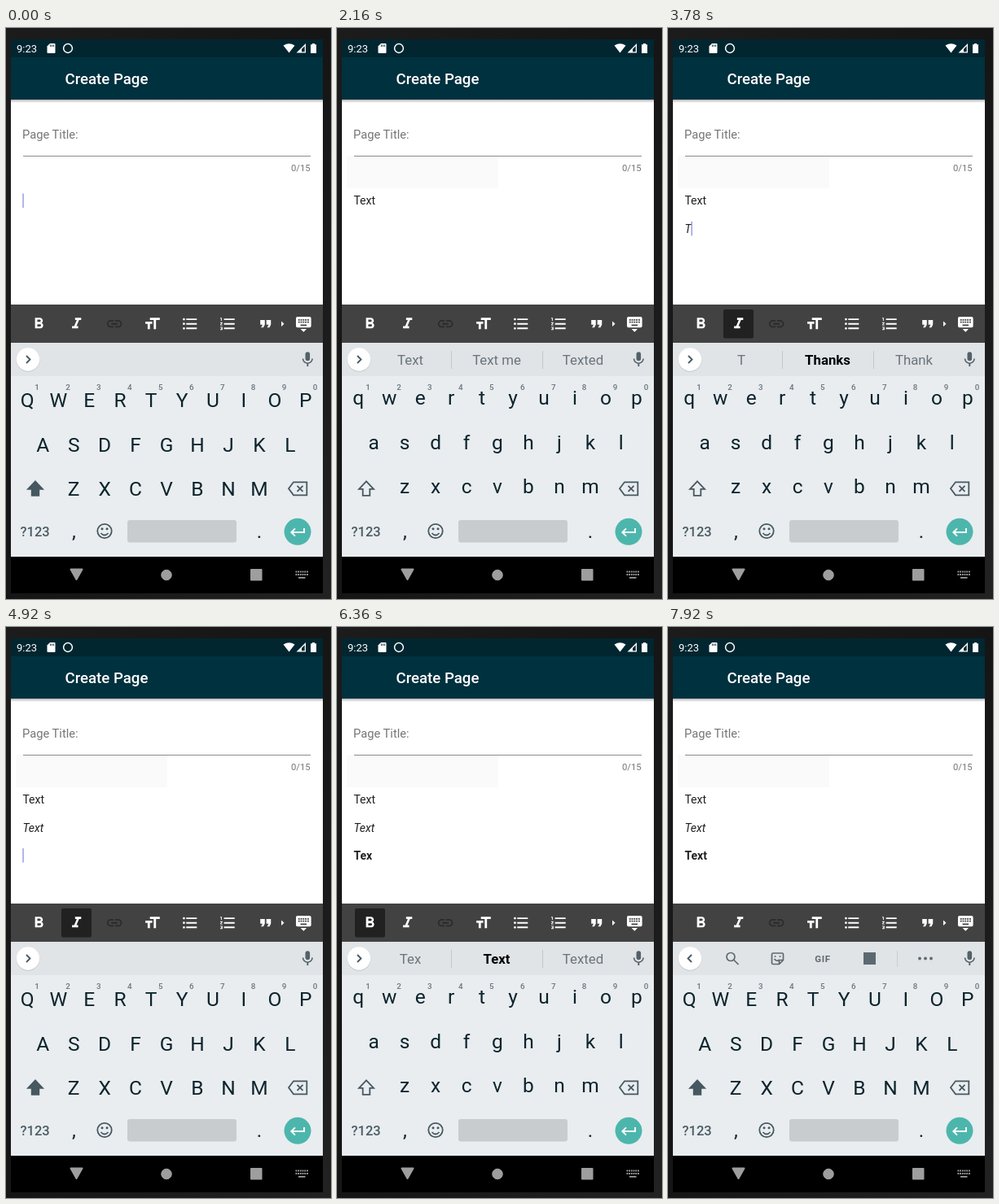
Recreate the animation shown at these times as an HTML page. Size 399x702 px, loop 8000 ms.

```html
<!DOCTYPE html>
<html lang="en">
<head>
<meta charset="utf-8">
<style>
html, body { margin: 0; width: 100%; height: 100%; overflow: hidden; background: #171717; }
svg { display: block; }
text { font-family: Roboto, "Liberation Sans", sans-serif; white-space: pre; }
.mid { text-anchor: middle; }
.key { font-size: 24.5px; fill: #0c242c; }
.num { font-size: 9.8px; font-weight: 500; fill: #69757b; }
.word { font-size: 16.8px; fill: #6a747a; }
.word.best { font-weight: 700; fill: #000; }
.body { font-size: 14px; fill: #212121; }
.line { fill: none; stroke: #465860; stroke-width: 1.8; }
</style>
</head>
<body>
<svg width="399" height="702" viewBox="0 0 399 702">
  <defs>
    <linearGradient id="wall" x2="1" y2="1">
      <stop offset="0" stop-color="#1c1c1c"/><stop offset=".5" stop-color="#151515"/><stop offset="1" stop-color="#222"/>
    </linearGradient>
    <linearGradient id="shade" x2="0" y2="1">
      <stop offset="0" stop-color="#000" stop-opacity=".3"/><stop offset="1" stop-color="#000" stop-opacity="0"/>
    </linearGradient>
  </defs>
  <rect width="399" height="702" fill="url(#wall)"/>

  <!-- status and app bars -->
  <rect x="6" y="14" width="383" height="22" fill="#012630"/>
  <rect x="6" y="36" width="383" height="52" fill="#00313f"/>
  <g fill="#fff">
    <text x="13" y="30" font-size="13">9:23</text>
    <path d="M54 19h5.5q1 0 1 1v10q0 1-1 1h-8q-1 0-1-1v-7.500z"/>
    <path d="M54.500 20.500v2.500M56.500 20.500v2.500M58.500 20.500v2.500" stroke="#012630" stroke-width=".9"/>
    <circle cx="76" cy="25" r="5.400" fill="none" stroke="#fff" stroke-width="1.500"/>
    <path d="M340.500 21.500q7-4.500 14 0l-7 9z"/>
    <path d="M368 19v11.500h-11.500zm-1.300 3.200l-3.700 3.700v3.300h3.700z" fill-rule="evenodd"/>
    <path d="M376 19h3v1.300h2v10.700h-7v-10.700h2z"/>
    <text x="72.500" y="69" font-size="18.640" font-weight="500">Create Page</text>
  </g>

  <!-- page form -->
  <rect x="6" y="88" width="383" height="252" fill="#fff"/>
  <rect x="6" y="88" width="383" height="4" fill="url(#shade)"/>
  <rect id="patch" x="12" y="157" width="186" height="40" fill="#fafafa"/>
  <path d="M21 157.500H374" stroke="#8c8c8c"/>
  <g fill="#757575">
    <text x="20" y="136" font-size="14.700">Page Title:</text>
    <text x="373.500" y="176" font-size="11.200" text-anchor="end">0/15</text>
  </g>
  <g id="lines"></g>
  <rect id="caret" width="1.500" height="17.500" fill="#9a9fe4"/>

  <!-- formatting bar -->
  <rect x="6" y="340" width="383" height="47" fill="#424242"/>
  <rect id="active" y="346" width="37" height="35.500" rx="2" fill="#212121"/>
  <g id="tools" fill="#fff"></g>
  <path d="M338 360.500l3.500 3.300-3.500 3.300z" fill="#fff"/>

  <!-- keyboard -->
  <rect x="6" y="387" width="383" height="41" fill="#e0e4e7"/>
  <rect x="6" y="428" width="383" height="222" fill="#e9edf0"/>
  <circle cx="27" cy="408.300" r="14.500" fill="#c6cbce"/>
  <circle cx="27" cy="407.500" r="14.200" fill="#fff"/>
  <path id="chevron" class="line"/>
  <g id="words"></g>
  <g id="panel" fill="#5d6970">
    <g fill="none" stroke="#5d6970" stroke-width="1.700">
      <circle cx="77" cy="405.500" r="5"/><path d="M80.500 409l6 6"/>
      <path d="M129 401h11q1.500 0 1.500 1.500v7l-5 5h-7.500q-1.500 0-1.500-1.500v-10.500q0-1.500 1.500-1.500zM141 409.500h-4.500v4.500M130.500 408q3 4 6 1"/>
    </g>
    <circle cx="131.500" cy="405" r="1"/><circle cx="137.500" cy="405" r="1"/>
    <text class="mid" x="190" y="411.500" font-size="11.500" font-weight="700" letter-spacing=".7">GIF</text>
    <rect x="240" y="400" width="15" height="15"/>
    <path d="M281.500 398v20" stroke="#c8cdd0"/>
    <circle cx="309" cy="407.500" r="1.900"/><circle cx="316" cy="407.500" r="1.900"/><circle cx="323" cy="407.500" r="1.900"/>
  </g>
  <g id="keys"></g>
  <path id="shift" class="line" d="M36 557.300l9 9.500h-4.700v8h-8.600v-8h-4.700z"/>
  <path class="line" d="M353 558.300h16.300v16H353l-6-8zM357.500 562.800l7 7m0-7l-7 7"/>
  <text x="17.500" y="625" font-size="16.500" font-weight="500" fill="#4b5c64">?123</text>
  <text class="key mid" x="83.500" y="627">,</text>
  <text class="key mid" x="311" y="627">.</text>
  <circle class="line" cx="121" cy="618.500" r="8.700"/>
  <path class="line" d="M116.500 621q4.500 5 9 0"/>
  <circle cx="118" cy="615.800" r="1.500" fill="#465860"/><circle cx="124" cy="615.800" r="1.500" fill="#465860"/>
  <rect x="149" y="605" width="134" height="27.500" rx="3" fill="#c8cccf"/>
  <circle cx="358" cy="619.300" r="16.500" fill="#4db6ac"/>
  <path d="M366 615v5h-15.500M355 615.300l-4.700 4.700 4.700 4.700" fill="none" stroke="#fff" stroke-width="1.900"/>

  <!-- navigation bar -->
  <rect x="6" y="650" width="383" height="45"/>
  <g fill="#9e9e9e" stroke="#9e9e9e" stroke-linejoin="round">
    <path d="M79.500 665.500h14l-7 12.500z" stroke-width="2"/>
    <circle cx="197" cy="672.500" r="6.300"/>
    <rect x="300.500" y="665.500" width="13.500" height="13.500"/>
    <path d="M355.500 668.500h15.500M355.500 672h15.500" stroke-width="1.800" stroke-dasharray="1.800 .9"/>
    <path d="M359 675.800h8.500" stroke-width="1.800"/>
  </g>
</svg>
<script>
const LOOP = 8000, SCALE = .932, PITCH = 37.95, LINE = 34.3;
const $ = id => document.getElementById(id);

function add(parent, tag, attrs, content = '') {
  const el = document.createElementNS('http://www.w3.org/2000/svg', tag);
  for (const name in attrs) el.setAttribute(name, attrs[name]);
  el.textContent = content;
  return parent.appendChild(el);
}
const show = (el, on) => el.setAttribute('visibility', on ? 'visible' : 'hidden');

// Icons live on a 24-unit grid, placed by their centre.
const icon = (parent, cx, cy, d, fill) => add(parent, 'path', {
  d, fill, transform: `translate(${cx - 12 * SCALE} ${cy - 12 * SCALE}) scale(${SCALE})`
});
const bars = 'M7 19h14v-2H7zM7 13h14v-2H7zM7 5v2h14V5z';
const dot = y => `M2.500 ${y}a1.500 1.500 0 1 0 3 0a1.500 1.500 0 1 0-3 0`;
const keycaps = [5, 8, 11, 14, 17].map(x => `M${x} 6v2h2v-2zM${x} 9v2h2v-2z`).join('');
[
  'M15.600 10.790c.97-.67 1.650-1.770 1.650-2.790 0-2.260-1.750-4-4-4H7v14h7.040c2.090 0 3.710-1.700 3.710-3.790 0-1.520-.86-2.820-2.150-3.420zM10 6.500h3c.83 0 1.500.67 1.500 1.500s-.67 1.500-1.500 1.500h-3zm3.500 9H10v-3h3.500c.83 0 1.500.67 1.500 1.500s-.67 1.500-1.500 1.500z',
  'M10 4v3h2.210l-3.420 8H6v3h8v-3h-2.210l3.420-8H18V4z',
  'M3.900 12c0-1.710 1.390-3.100 3.100-3.100h4V7H7a5 5 0 0 0 0 10h4v-1.900H7c-1.710 0-3.100-1.390-3.100-3.100zM8 13h8v-2H8zm9-6h-4v1.900h4a3.100 3.100 0 0 1 0 6.200h-4V17h4a5 5 0 0 0 0-10z',
  'M9 4v3h5v12h3V7h5V4zM3 12h3v7h3v-7h3V9H3z',
  bars + dot(6) + dot(12) + dot(18),
  bars + 'M2 17h2v.5H3v1h1v.5H2v1h3v-4H2zM3 8h1V4H2v1h1zM2 11h1.800L2 13.100v.9h3v-1H3.200L5 10.900V10H2z',
  'M6 17h3l2-4V7H5v6h3zM14 17h3l2-4V7h-6v6h3z'
].forEach((d, i) => icon($('tools'), 40.3 + 46.4 * i, 363.7, d, i === 2 ? '#2b2b2b' : '#fff'));
icon($('tools'), 365.3, 363.5, 'M4 3h16q2 0 2 2v10q0 2-2 2H4q-2 0-2-2V5q0-2 2-2z' + keycaps + 'M8 13v2h8v-2zM12 23l4-4H8z', '#fff')
  .setAttribute('fill-rule', 'evenodd');
icon($('keys'), 370.3, 407.5, 'M12 14a3 3 0 0 0 3-3V5a3 3 0 0 0-6 0v6a3 3 0 0 0 3 3zm5.300-3a5.300 5.300 0 0 1-10.600 0H5c0 3.410 2.720 6.230 6 6.720V21h2v-3.280c3.280-.48 6-3.300 6-6.720z', '#546168');

// Letter keys: first centre and capital baseline of each row
const letters = [];
[['qwertyuiop', 26.3, 466], ['asdfghjkl', 45.2, 520.7], ['zxcvbnm', 83.2, 575]].forEach(([row, x, y]) =>
  [...row].forEach((char, i) =>
    letters.push({ char, y, el: add($('keys'), 'text', { class: 'key mid', x: x + PITCH * i }) })));
[...'1234567890'].forEach((n, i) =>
  add($('keys'), 'text', { class: 'num mid', x: 38 + PITCH * i, y: 445 }, n));

const words = [90, 196, 302].map(x => add($('words'), 'text', { x, y: 414 }));
add($('words'), 'path', { d: 'M140.500 397v22M252.500 397v22', stroke: '#c1c6c9' });
const lines = [0, 1, 2, 3].map(i => add($('lines'), 'text', { class: 'body', x: 20.4, y: 217.3 + LINE * i }));

// An asterisk marks the highlighted suggestion.
const hints = {
  T: ['T', 'Thanks*', 'Thank'],
  Te: ['Te', 'Text*', 'Tell'],
  Tex: ['Tex', 'Text*', 'Texted'],
  Text: ['Text', 'Text me', 'Texted']
};
const actions = [
  [1020, 'T'], [1320, 'e'], [1680, 'x'], [1980, 't'],
  [2760, 'enter'], [3060, 'italic'],
  [3780, 'T'], [4020, 'e'], [4260, 'x'], [4500, 't'],
  [4920, 'enter'], [5580, 'plain'], [5700, 'bold'],
  [5820, 'T'], [6120, 'e'], [6360, 'x'], [6660, 't'],
  [7080, 'enter'], [7260, 'plain']
];

function stateAt(t) {
  const rows = [{ text: '', style: 'plain' }];
  let style = 'plain';
  for (const [time, action] of actions) {
    if (time > t) break;
    if (action === 'enter') rows.push({ text: '', style });
    else if (action.length > 1) rows.at(-1).style = style = action;
    else rows.at(-1).text += action;
  }
  return { rows, style };
}

function draw(t) {
  const { rows, style } = stateAt(t);
  const last = rows.length - 1, typed = rows[last].text, caps = !typed, panel = t >= 7260;

  lines.forEach((el, i) => {
    const row = rows[i] || { text: '' };
    el.textContent = row.text;
    el.setAttribute('font-style', row.style === 'italic' ? 'italic' : 'normal');
    el.setAttribute('font-weight', row.style === 'bold' ? 700 : 400);
  });
  const width = typed ? lines[last].getComputedTextLength() : 0;
  $('caret').setAttribute('x', 20.3 + width);
  $('caret').setAttribute('y', 203.5 + LINE * last);
  show($('caret'), (t + 720) % 960 >= 480);
  $('patch').setAttribute('opacity', Math.min(1, Math.max(0, (t - 240) / 480)));

  show($('active'), style !== 'plain');
  $('active').setAttribute('x', style === 'bold' ? 22 : 68);

  for (const { char, y, el } of letters) {
    el.textContent = caps ? char.toUpperCase() : char;
    el.setAttribute('y', caps ? y : y - 2.8);
  }
  $('shift').style.fill = caps ? '#465860' : 'none';

  show($('words'), !caps);
  show($('panel'), panel);
  $('chevron').setAttribute('d', panel ? 'M29 403l-4.500 4.500 4.500 4.500' : 'M25 403l4.500 4.500-4.500 4.500');
  if (!caps) hints[typed].forEach((hint, i) => {
    words[i].textContent = hint.replace('*', '');
    words[i].setAttribute('class', hint.endsWith('*') ? 'word mid best' : 'word mid');
  });
}

const start = performance.now();
(function tick() {
  draw((performance.now() - start) % LOOP);
  requestAnimationFrame(tick);
})();
</script>
</body>
</html>
```
